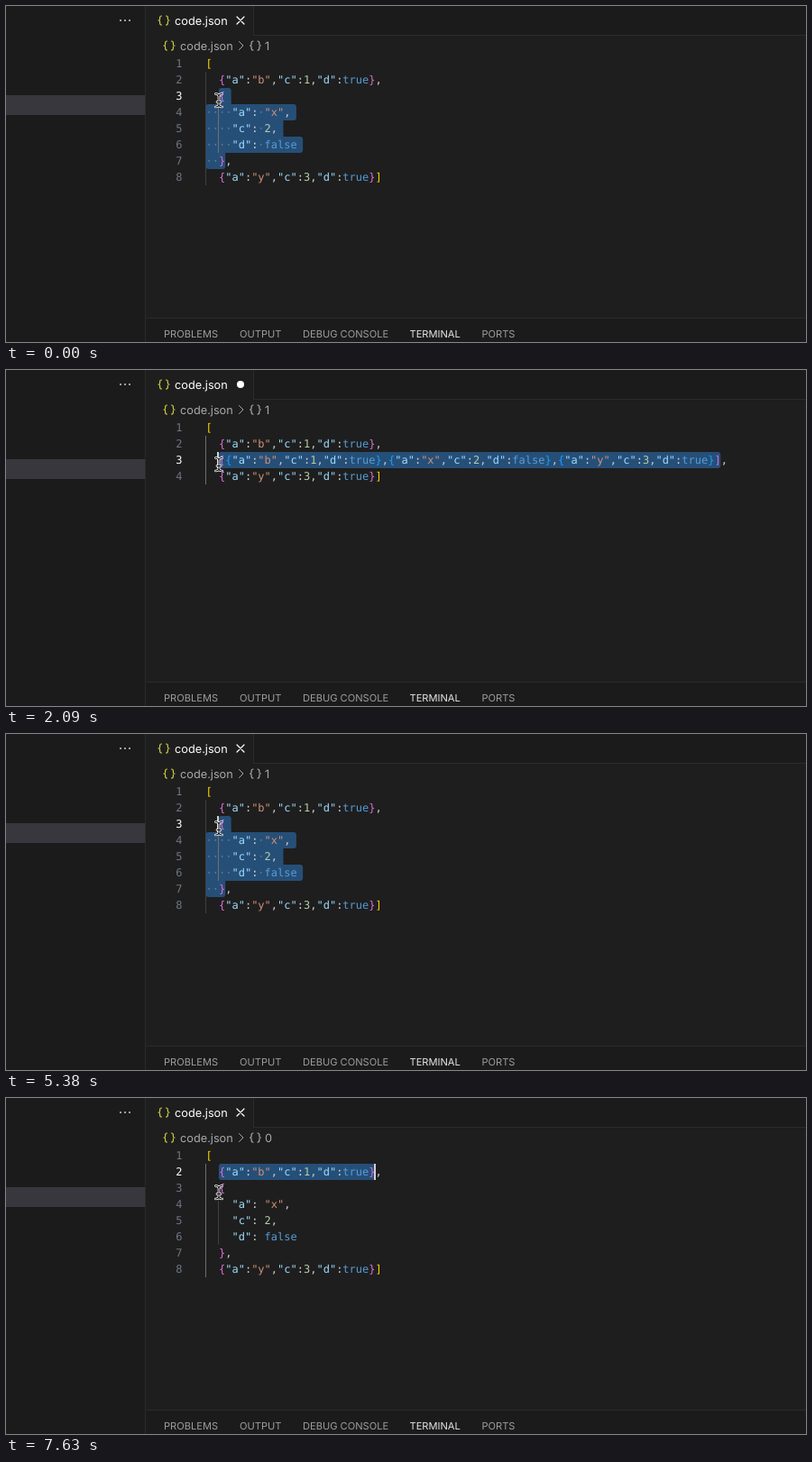
An HTML page that plays this animation: 887x373 px, repeating every 8000 ms.

```html
<!DOCTYPE html>
<html lang="en">
<head>
<meta charset="utf-8">
<style>
  html, body { margin: 0; width: 100%; height: 100%; overflow: hidden; background: #1e1e1e; }
  svg { display: block; }
  text { font: 12.74px Inter, "DejaVu Sans", sans-serif; text-rendering: geometricPrecision; }
  .code { font: 12px "DejaVu Sans Mono", monospace; }
  .panel { font-size: 11.1px; }
  .key { font-size: 11px; text-anchor: middle; }
  .end { text-anchor: end; }
  .palette { filter: drop-shadow(0 0 8px rgba(0, 0, 0, .4)); }
</style>
</head>
<body>
<svg id="stage" width="887" height="373" viewBox="0 0 887 373"></svg>
<script>
const LOOP = 8000, LEFT = 221.5, CHAR = 7.2246, LINE = 18, TOP = 55;
const stage = document.getElementById('stage');

const first = '  {"a":"b","c":1,"d":true},';
const last = '  {"a":"y","c":3,"d":true}]';
const expanded = ['[', first, '  {', '    "a": "x",', '    "c": 2,', '    "d": false', '  },', last];
const compacted = ['[', first,
  '  [{"a":"b","c":1,"d":true},{"a":"x","c":2,"d":false},{"a":"y","c":3,"d":true}],', last];

const commands = ['Compact JSON', 'Format JSON', 'Accounts: Manage Trusted Extensions For Account',
  'Accounts: Manage Trusted MCP Servers For Account', 'Add Cursor Above', 'Add Cursor Below',
  'Add Cursors to Bottom', 'Add Cursors to Line Ends', 'Add Cursors to Top',
  'Add Data Breakpoint at Address', 'Add Function Breakpoint', 'Add Line Comment',
  'Add Selection to Next Find Match', 'Add Selection to Previous Find Match', 'Add XHR/fetch Breakpoint'];
const shortcuts = { 4: '⌥⌘↑', 5: '⌥⌘↓', 7: '⇧⌥I', 11: '⌘K ⌘C', 12: '⌘D' };

const rect = (x, y, w, h, fill, extra = '') =>
  `<rect x="${x}" y="${y}" width="${w}" height="${h}" fill="${fill}" ${extra}/>`;
const text = (x, y, s, fill, cls = '') => `<text x="${x}" y="${y}" fill="${fill}" class="${cls}">${s}</text>`;
const line = (d, color, width = 1) =>
  `<path d="${d}" fill="none" stroke="${color}" stroke-width="${width}" stroke-linecap="round" stroke-linejoin="round"/>`;
const colX = col => LEFT + col * CHAR;
const lineY = n => TOP + (n - 1) * LINE;

// Icon made of a left half and its mirror image, centred on x, y.
const pair = (x, y, d, color) => [1, -1].map(side =>
  `<g transform="translate(${x} ${y}) scale(${side} 1)">${line(d, color, 1.2)}</g>`).join('');
const braces = (x, y, color) =>
  pair(x, y, 'M-2.5-5Q-4.4-5-4.4-3V-1.5Q-4.4 0-6 0Q-4.4 0-4.4 1.5V3Q-4.4 5-2.5 5', color);
const brackets = (x, y, color) => pair(x, y, 'M-3.5-5H-6V5H-3.5', color);

const gear = y => `<g fill="none" stroke="#ccc"><circle cx="669" cy="${y}" r="4.7" stroke-width="1.1"/>
  <circle cx="669" cy="${y}" r="6" stroke-width="1.8" stroke-dasharray="2.36"/>
  <circle cx="669" cy="${y}" r="1.8"/></g>`;

function keys(combo, right, y) {
  let out = '';
  for (const k of [...combo].reverse()) {
    if (k === ' ') { right -= 3; continue; }
    const w = '⌘⌥⇧'.includes(k) ? 22.5 : k === 'I' ? 15 : 21;
    out += rect(right - w + .5, y - 8.5, w - 1, 17, '#323232', 'rx="3" stroke="#393939"') +
      text(right - w / 2, y + 4, k, '#d4d4d4', 'key');
    right -= w + 4;
  }
  return out;
}

function palette() {
  let out = rect(98.5, -20, 601, 344.5, '#222222', 'rx="7" stroke="#3f3f3f" class="palette"') +
    rect(106, 0, 585, 1, '#0078d4') + rect(105, 5, 588, 22, '#04395e', 'rx="3"') +
    rect(105, 93, 588, 22, '#2b2b2b', 'rx="3"') + rect(105, 49, 588, 1, '#3f3f42') +
    rect(689, 5, 10, 20, '#4f4f4f');
  commands.forEach((name, i) => {
    const y = 16 + i * 22 + (i === 2 ? 1 : 0);
    out += text(116, y + 4.8, name, i ? '#d4d4d4' : '#fff');
    if (shortcuts[i]) out += keys(shortcuts[i], i === 4 ? 651 : 675, y);
  });
  out += text(655, 20.8, 'recently used', '#fff', 'end') +
    text(679, 65.8, 'other commands', '#3794ff', 'end') + gear(16) + gear(104);
  return `<clipPath id="list"><rect width="887" height="325"/></clipPath>
    <g>${out.replace(/<text/g, '<text clip-path="url(#list)"')}</g>`;
}

function code({ lines, selection, plain, active }) {
  let depth = 0, out = '';
  lines.forEach((source, i) => {
    const n = i + 1, chosen = selection.find(s => s[0] === n);
    let spans = '', col = 0;
    for (const token of source.match(/"\w":?|\d|true|false|./g)) {
      let color = '#ccc', shown = token, tail = '';
      if ('[{'.includes(token)) color = ['#ffd700', '#da70d6', '#179fff'][depth++];
      else if (']}'.includes(token)) color = ['#ffd700', '#da70d6', '#179fff'][--depth];
      else if (token === ' ') {
        color = '#ffffff40';
        shown = chosen && col >= chosen[1] && col < chosen[2] ? '·' : '\u00a0';
      } else if (!(plain && n > 3 && n < 7)) {
        if (token.endsWith(':') && token.length > 1) { color = '#9cdcfe'; shown = token.slice(0, -1); tail = ':'; }
        else if (token[0] === '"') color = '#ce9178';
        else if (/\d/.test(token)) color = '#b5cea8';
        else if (/[tf]/.test(token)) color = '#569cd6';
      }
      spans += `<tspan fill="${color}">${shown}</tspan>${tail}`;
      col += token.length;
    }
    out += text(LEFT, lineY(n) + 13, spans, '#d4d4d4', 'code') +
      text(195.5, lineY(n) + 13, n, n === active ? '#fff' : '#6e7681', 'code end');
  });
  return out;
}

function highlight(selection) {
  const rows = selection.map(([n, from, to, newline]) =>
    ({ y: lineY(n), x: colX(from), end: colX(to) + (newline ? 6.5 : 0) }));
  return rows.map((r, i) => {
    const next = rows[i + 1];
    let out = rect(r.x, r.y, r.end - r.x, LINE, '#264f78', 'rx="3"');
    if (next) {
      const x = Math.max(r.x, next.x);
      out += rect(x, next.y - 3, Math.min(r.end, next.end) - x, 6, '#264f78');
    }
    return out;
  }).join('');
}

const block = [[3, 2, 3, true], [4, 0, 13, true], [5, 0, 11, true], [6, 0, 14, true], [7, 0, 3]];

function stateAt(t) {
  const between = (a, b) => t >= a && t < b;
  const compact = between(2090, 3280), onSecond = t >= 6730;
  const state = {
    palette: between(590, 2090),
    hand: between(450, 2090),
    dirty: compact,
    lines: compact ? compacted : expanded,
    plain: between(3280, 3430),
    active: onSecond ? 2 : 3,
    innerScope: !compact && !onSecond,
    caretCol: 2,
    caret: !(t < 300 || between(2690, 3140) || between(3880, 4330) || between(4780, 5380) || between(5830, 6280)),
    match: between(6880, 7180),
    lineBox: between(6730, 7180),
    crumb: between(2690, 3880) ? 'array' : between(7330, 7630) ? 'none' : 'object',
    index: t < 6880 ? 1 : 0,
    selection: compact ? [[3, 2, 79]] : block
  };
  if (onSecond) {
    state.caretCol = t < 7180 ? 2 : t < 7480 ? 27 : 26;
    state.selection = t < 7180 ? [] : [[2, 2, state.caretCol]];
  }
  return state;
}

function breadcrumb(s) {
  const grey = '#a9a9a9';
  let out = braces(181, 44, '#cbcb41') + text(193, 48.8, 'code.json', grey) +
    line('M258.5 39.5L263 44L258.5 48.5', grey);
  if (s.crumb === 'none') return out + text(270, 48.8, '…', grey);
  return out + (s.crumb === 'array' ? brackets : braces)(276.5, 44, grey) + text(287, 48.8, s.index, grey);
}

function editor(s) {
  const guide = (col, from, to, on) =>
    rect(Math.floor(colX(col)), lineY(from), 1, (to - from + 1) * LINE, on ? '#707070' : '#404040');
  let out = s.lineBox ? rect(223, 74, 670, 16, 'none', 'stroke="#2c2c2c" stroke-width="2"') : '';
  out += highlight(s.selection) + guide(0, 2, s.lines.length, !s.innerScope);
  if (s.lines === expanded) out += guide(2, 4, 6, s.innerScope);
  if (s.match) for (const col of [2, 25])
    out += rect(colX(col) + .5, 73.5, CHAR - 1, 17, '#0064001a', 'stroke="#888"');
  out += code(s);
  if (s.caret) out += rect(Math.floor(colX(s.caretCol)) - 1, lineY(s.active), 2, LINE, '#d0d0d0');
  return out;
}

function frame() {
  const tabs = [[175, 'PROBLEMS'], [259, 'OUTPUT'], [329, 'DEBUG CONSOLE'], [447.5, 'TERMINAL'], [527.5, 'PORTS']];
  return rect(0, 0, 887, 373, '#1e1e1e') + rect(0, 0, 154, 373, '#1b1b1b') +
    rect(275, 0, 612, 32, '#1b1b1b') + rect(155, 347, 732, 26, '#1b1b1b') +
    rect(0, 99, 154, 22, '#37373d') + rect(154, 0, 1, 373, '#2b2b2b') +
    rect(274, 0, 1, 33, '#2b2b2b') + rect(274, 32, 613, 1, '#2b2b2b') + rect(155, 346, 732, 1, '#2b2b2b') +
    [127, 132, 137].map(x => `<circle cx="${x}" cy="16" r="1" fill="#ccc"/>`).join('') +
    braces(175, 16, '#cbcb41') + text(187, 20.5, 'code.json', '#fff') +
    tabs.map(([x, s]) => text(x, 368, s, s === 'TERMINAL' ? '#e7e7e7' : '#9d9d9d', 'panel')).join('');
}

function pointer(hand) {
  if (hand) return `<path d="M233 107Q234.5 105.4 236 107.3L238 111Q239.2 109.8 240.2 111
    Q241.5 110.2 242.2 111.5Q243.5 111.2 243.8 112.6L244.6 116Q244.8 118 243.8 119.4L243.8 120.8L238 121.4
    L237.4 119.8Q234.6 118.6 231.6 115.6Q230.8 114 232.6 113.8L235 115L232.8 108.6Z"
    fill="#fff" stroke="#000" stroke-width=".9"/>` + line('M239 115.5l.7 3M241 115l.7 3', '#000', .8);
  const beam = 'M232.5 97.5Q236 97.5 236 100.5Q236 97.5 239.5 97.5M236 100V110' +
    'M232.5 112Q236 112 236 109Q236 112 239.5 112M234 106.5H238';
  return line(beam, '#fff', 2.7) + line(beam, '#111', 1.1);
}

const background = frame(), popup = palette();
let shown = '';

function render() {
  const s = stateAt(performance.now() % LOOP);
  const mark = s.dirty ? '<circle cx="260" cy="16" r="4" fill="#fff"/>'
    : line('M256 12L264 20M264 12L256 20', '#fff', 1.2);
  const picture = background + mark + breadcrumb(s) + editor(s) + (s.palette ? popup : '') + pointer(s.hand);
  if (picture !== shown) stage.innerHTML = shown = picture;
  requestAnimationFrame(render);
}
render();
</script>
</body>
</html>
```
